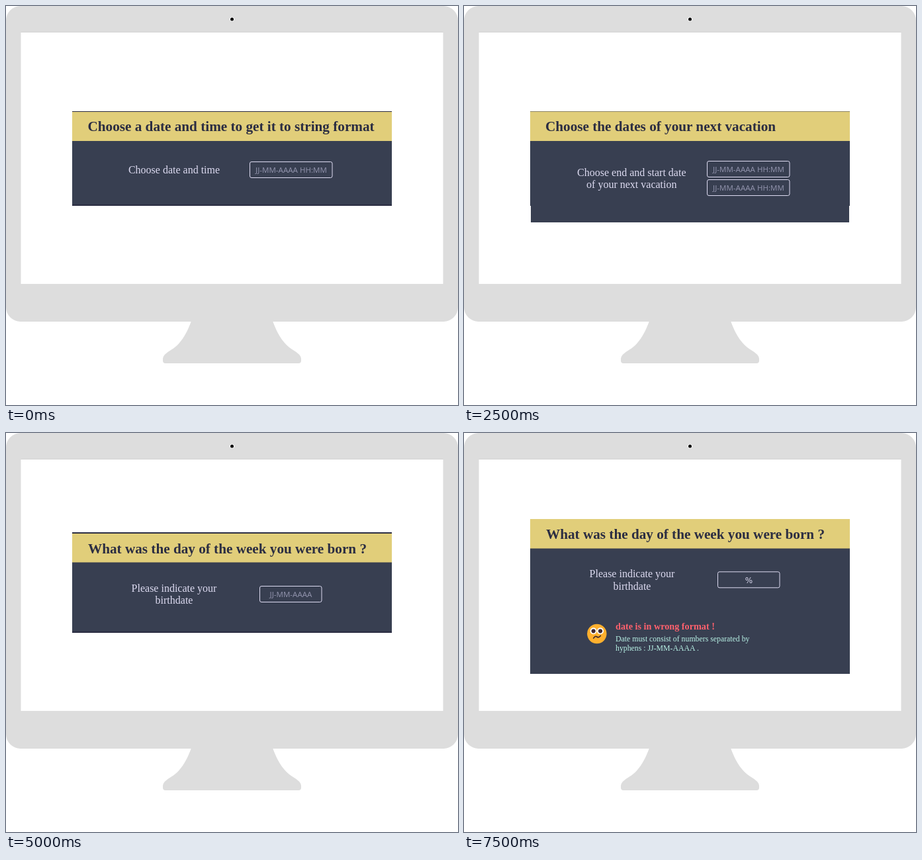
Animation of 683 by 603 pixels, one loop 8000 ms. Source, as an HTML page:

```html
<!DOCTYPE html>
<html lang="en">
<head>
<meta charset="utf-8">
<title>Date forms</title>
<style>
  html, body { margin: 0; width: 100%; height: 100%; overflow: hidden; background: #fff; }
  svg { display: block; }
  text { white-space: pre; }
  .title { font: bold 21.2px "Liberation Serif", "Times New Roman", serif; fill: #2b2d42; }
  .label { font: 16px "Liberation Serif", "Times New Roman", serif; text-anchor: middle; }
  .field { font: 11.5px "Noto Sans", "Open Sans", sans-serif; text-anchor: middle; }
  .typed { font: 12px "DejaVu Sans", sans-serif; text-anchor: middle; fill: #dddbf1; }
  .error { font: bold 14.2px "Liberation Serif", "Times New Roman", serif; fill: #ff616d; }
  .hint { font: 11.8px "Liberation Serif", "Times New Roman", serif; fill: #b8f2e6; }
</style>
</head>
<body>
<svg id="stage" width="683" height="603" viewBox="0 0 683 603">
  <rect width="683" height="477" rx="22" fill="#ddd"/>
  <path fill="#ddd" d="M280 476C273 496 263 512 249 520Q237 527 237 533V536Q237 540 241 540H442Q446 540 446 536V533Q446 527 434 520C420 512 410 496 403 476Z"/>
  <rect x="22.5" y="39" width="638" height="1" fill="#d3d3d3"/>
  <rect x="22.5" y="40" width="638" height="380" fill="#fff"/>
  <circle cx="341.5" cy="20" r="3.3" fill="#fff"/>
  <circle cx="341.5" cy="20" r="2.5" fill="#000"/>
</svg>
<script>
const NS = 'http://www.w3.org/2000/svg';
const GOLD = '#e1ce7a', SLATE = '#383f51', LILAC = '#dddbf1', NAVY = '#2b2d42';
const LOOP = 8000;

const forms = {
  format: {
    title: 'Choose a date and time to get it to string format',
    label: ['Choose date and time'],
    hint: 'JJ-MM-AAAA HH:MM', width: 125, fields: 1
  },
  trip: {
    title: 'Choose the dates of your next vacation',
    label: ['Choose end and start date', 'of your next vacation'],
    hint: 'JJ-MM-AAAA HH:MM', width: 125, fields: 2
  },
  birth: {
    title: 'What was the day of the week you were born ?',
    label: ['Please indicate your', 'birthdate'],
    hint: 'JJ-MM-AAAA', width: 94, fields: 1
  }
};

// box: left, top, right, bottom; head: gold band top and bottom
const scenes = [
  { at: 0, form: 'format', dark: true, box: [100, 159, 583, 302], head: [160, 204],
    title: [123.5, 189], label: [254, 253], field: [368.5, 235.5], rim: true },
  { at: 1500, form: 'format', box: [99, 161, 585, 300], head: [161, 206],
    title: [122.5, 191], label: [253.3, 254.5], field: [367.5, 237], corners: [584] },
  { at: 2500, form: 'trip', dark: true, box: [100, 159, 583, 302], head: [159.5, 204],
    title: [123, 188.5], label: [253.3, 256.5], field: [367.5, 234.5], tail: 327 },
  { at: 4000, form: 'trip', box: [99, 157, 585, 325], head: [157, 201],
    title: [123.5, 186.5], label: [254, 254.5], field: [368.5, 232.5], corners: [99, 584] },
  { at: 5000, form: 'birth', dark: true, box: [100, 150, 583, 302], head: [152, 195.5],
    title: [124, 181.5], label: [254, 239.5], field: [383.5, 231.5], rim: true },
  { at: 6500, form: 'birth', box: [98, 150, 581, 296], head: [150, 193.5],
    title: [121.5, 179.5], label: [251.2, 237.5], field: [381, 229] },
  { at: 7500, form: 'birth', dark: true, box: [100, 130, 583, 364], head: [130, 174.5],
    title: [124, 160], label: [254, 218.3], field: [383.5, 209.8], typed: '%', error: true }
];

function add(parent, tag, attrs, content) {
  const el = document.createElementNS(NS, tag);
  for (const key in attrs) el.setAttribute(key, attrs[key]);
  if (content) el.textContent = content;
  return parent.appendChild(el);
}

const rect = (g, x, y, x2, y2, fill) =>
  add(g, 'rect', { x, y, width: x2 - x, height: y2 - y, fill });

const text = (g, cls, x, y, str, fill) =>
  add(g, 'text', fill ? { class: cls, x, y, fill } : { class: cls, x, y }, str);

function drawFace(g, x, y) {
  const face = add(g, 'g', { transform: `translate(${x} ${y})` });
  add(face, 'circle', { r: 14.7, fill: '#ffb02e' });
  for (const cx of [-5.2, 5.2]) {
    add(face, 'circle', { cx, cy: -4.2, r: 5, fill: '#fff' });
    add(face, 'circle', { cx, cy: -4.2, r: 3.1, fill: '#402a32' });
  }
  add(face, 'path', {
    d: 'M-5 6.6Q-2.5 2.5 0 4.5T5.5 3', fill: 'none',
    stroke: '#402a32', 'stroke-width': 1.8, 'stroke-linecap': 'round'
  });
}

function drawScene(s) {
  const g = add(stage, 'g', { visibility: 'hidden' });
  const form = forms[s.form];
  const ink = s.dark ? LILAC : SLATE;
  const [x, y, x2, y2] = s.box;

  rect(g, x, y, x2, y2, s.dark ? SLATE : LILAC);
  if (s.tail) rect(g, x + 1, y2, x2 - 1, s.tail, SLATE);
  if (s.rim) {
    rect(g, x, y, x2, s.head[0], NAVY);
    rect(g, x, y2 - 2, x2, y2, NAVY);
  }
  for (const cx of s.corners || []) rect(g, cx, y2 - 1, cx + 1, y2, SLATE);
  rect(g, x, s.head[0], x2, s.head[1], GOLD);
  text(g, 'title', ...s.title, form.title);

  form.label.forEach((line, i) =>
    text(g, 'label', s.label[0], s.label[1] + i * 18.3, line, ink));

  const [fx, fy] = s.field;
  for (let i = 0; i < form.fields; i++) {
    const top = fy + i * 28;
    add(g, 'rect', {
      x: fx, y: top, width: form.width - 0.5, height: 24, rx: 2.5,
      fill: 'none', stroke: ink
    });
    const mid = fx + form.width / 2;
    if (s.typed) text(g, 'typed', mid, top + 17.5, s.typed);
    else text(g, 'field', mid, top + 16.7, form.hint, s.dark ? '#8f91aa' : '#83859a');
  }

  if (s.error) {
    drawFace(g, 200.8, 303.5);
    text(g, 'error', 229, 297, 'date is in wrong format !');
    text(g, 'hint', 229, 315, 'Date must consist of numbers separated by');
    text(g, 'hint', 229, 329, 'hyphens : JJ-MM-AAAA .');
  }
  return g;
}

const stage = document.getElementById('stage');
const layers = scenes.map(drawScene);
const start = performance.now();
let shown = -1;

function tick(now) {
  const t = Math.max(0, now - start) % LOOP;
  const current = scenes.filter(s => s.at <= t).length - 1;
  if (current !== shown) {
    layers.forEach((g, i) => g.setAttribute('visibility', i === current ? 'visible' : 'hidden'));
    shown = current;
  }
  requestAnimationFrame(tick);
}
tick(start);
</script>
</body>
</html>
```
